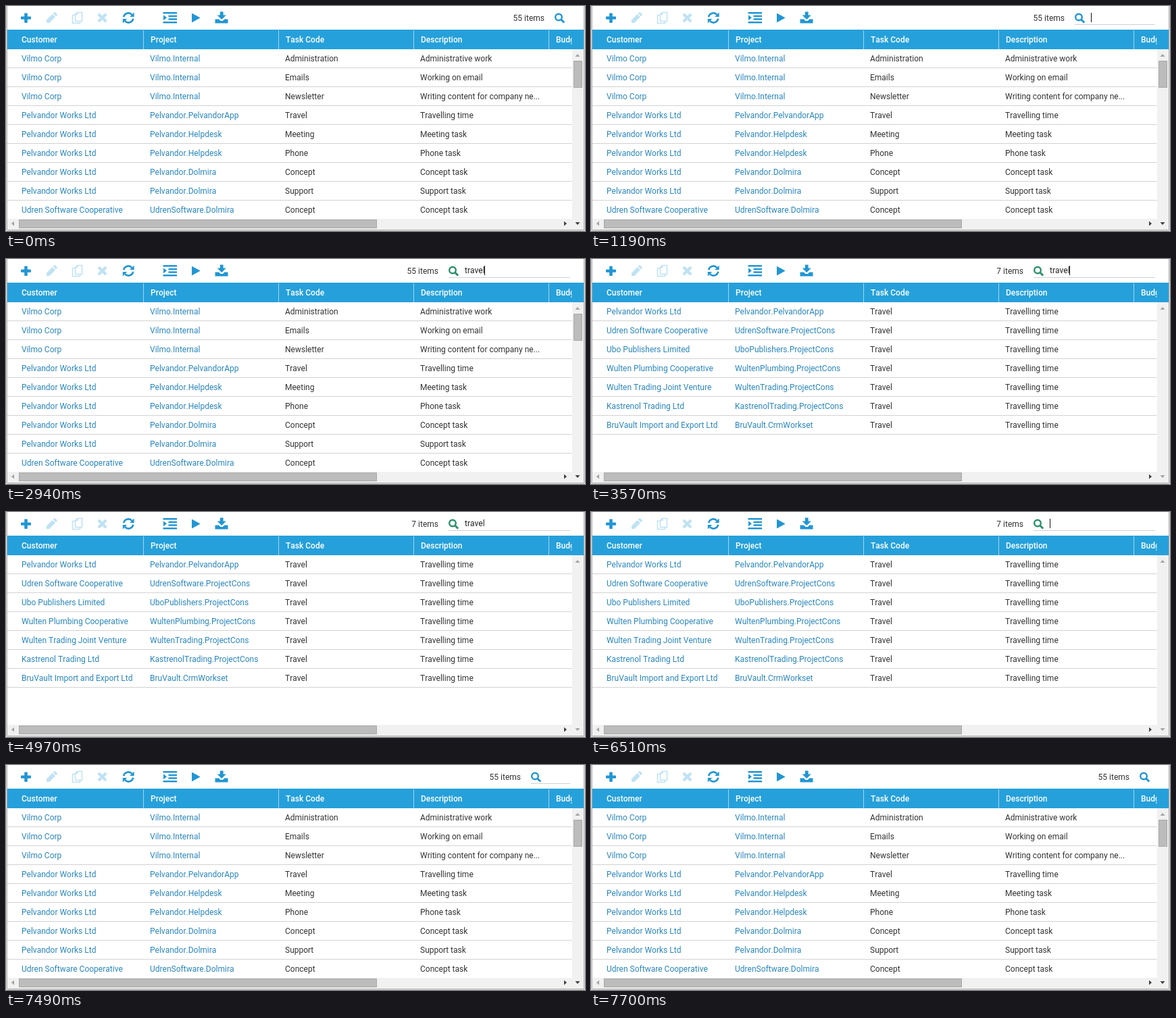
These frames come from a looping animation (857x333 px, 8.82 s). An HTML page:

```html
<!DOCTYPE html>
<html lang="en">
<head>
<meta charset="utf-8">
<title>Task grid search</title>
<style>
  html, body { margin: 0; width: 100%; height: 100%; overflow: hidden; background: #fff; }
  svg { display: block; }
  text { font: 12px Roboto, Arial, sans-serif; font-kerning: none; fill: #333; white-space: pre; }
  .head text { font-weight: 500; fill: #fff; }
  .link { fill: #2a86bd; }
  .icon { fill: #2196d3; }
  .off { fill: #bfe2f4; }
</style>
</head>
<body>
<svg id="stage" width="857" height="333" viewBox="0 0 857 333">
  <defs>
    <clipPath id="body"><rect x="2" y="36" width="835.5" height="279"/></clipPath>
  </defs>
  <rect width="857" height="333" fill="#fff"/>

  <g class="icon">
    <path d="M28 10.5h3q.8 0 .8.8v4.3h4.400q.8 0 .8.8V19q0 .8-.8.8h-4.400v4.300q0 .8-.8.8h-3q-.8 0-.8-.8v-4.300h-4.400q-.8 0-.8-.8v-2.600q0-.8.8-.8h4.400v-4.300q0-.8.8-.8z"/>
    <g id="arrow"><path d="M174.200 16.200A7 7 0 0 1 186.300 12.800" fill="none" stroke="#2196d3" stroke-width="2.700"/><path d="M189.600 9.600v6.400h-6.400z"/></g>
    <use href="#arrow" transform="rotate(180 181.200 17.500)"/>
    <path d="M232.500 9H253v2.500h-20.500zM240.500 13.700H253v2.500h-12.500zM240.500 18.300H253v2.500h-12.500zM232.500 23H253v2.500h-20.500zM233 13.200l5 4-5 4z"/>
    <path d="M275 11.300q0-.8.800-.400l11 6.200q.7.400 0 .8l-11 6.200q-.8.400-.8-.4z"/>
    <path d="M316.800 8.500h4.800v5h4.200l-6.600 6.500-6.600-6.500h4.200zM309.500 19.500h5.500l2.600 2.500h3.200l2.600-2.500h5.100v6h-19z"/>
  </g>
  <g class="off">
    <path d="M60 25v-4.300l8.600-8.700 4.300 4.300L64.300 25zM69.600 11l1.600-1.500q1-.8 1.900 0l2.400 2.400q.8 1 0 1.900L73.900 15.300z"/>
    <path d="M105.500 9.500h7V22.500H102.500V12.500zM105.500 9.500v3h-3M102.500 13.500H98.500V25.500H109.500V22.500" fill="none" stroke="#bfe2f4" stroke-width="1.500"/>
    <g transform="translate(142.500 17.500) rotate(45)"><rect x="-8" y="-2.100" width="16" height="4.200" rx=".8"/><rect x="-2.100" y="-8" width="4.200" height="16" rx=".8"/></g>
  </g>

  <rect x="2" y="35" width="853" height="29" fill="#26a0da"/>
  <g class="head" id="head" clip-path="url(#body)"></g>
  <g id="rows" clip-path="url(#body)"></g>

  <rect x="2" y="315" width="836" height="16" fill="#f1f1f1"/>
  <rect x="838" y="64" width="17" height="267" fill="#f1f1f1"/>
  <rect x="19.500" y="316.500" width="529" height="12" fill="#bcbcbc" stroke="#a8a8a8"/>
  <rect id="thumb" x="840.500" y="81.500" width="12" height="39" fill="#bcbcbc" stroke="#a8a8a8"/>
  <path d="M12 318.500v7l-4-3.500zM842.500 75h7l-3.500-4z" fill="#a3a3a3"/>
  <path d="M826 318.500v7l4-3.500z" fill="#404040"/>
  <path id="down" d="M842.500 320h7l-3.500 4z"/>
  <path d="M.5 0V332.500H856.500V0" fill="none" stroke="#dcdcdc"/>
  <path d="M1.500 0V331.500H855.500V0" fill="none" stroke="#adadad"/>

  <text id="count" y="22" text-anchor="end"></text>
  <g id="field">
    <g id="lens" fill="none" stroke-width="2.400">
      <circle cx="6" cy="16.500" r="4.800"/>
      <path d="M9.600 20l4.600 4.500" stroke-width="3"/>
    </g>
  </g>
  <rect id="line" y="27" height="1" fill="#d0d0d0"/>
  <rect id="mark" y="10" height="14" fill="#39f"/>
  <text id="query" x="679" y="21"></text>
  <rect id="caret" y="10" width="1" height="14" fill="#111"/>
</svg>
<script>
const $ = id => document.getElementById(id);
const LOOP = 8820, STEP = 70, RIGHT = 835, CLOSED = 23, OPEN = 180;
const cols = [23, 213, 413, 613, 813];
const pelvandor = 'Pelvandor Works Ltd';
const all = [
  ['Vilmo Corp', 'Vilmo.Internal', 'Administration', 'Administrative work'],
  ['Vilmo Corp', 'Vilmo.Internal', 'Emails', 'Working on email'],
  ['Vilmo Corp', 'Vilmo.Internal', 'Newsletter', 'Writing content for company ne...'],
  [pelvandor, 'Pelvandor.PelvandorApp', 'Travel', 'Travelling time'],
  [pelvandor, 'Pelvandor.Helpdesk', 'Meeting', 'Meeting task'],
  [pelvandor, 'Pelvandor.Helpdesk', 'Phone', 'Phone task'],
  [pelvandor, 'Pelvandor.Dolmira', 'Concept', 'Concept task'],
  [pelvandor, 'Pelvandor.Dolmira', 'Support', 'Support task'],
  ['Udren Software Cooperative', 'UdrenSoftware.Dolmira', 'Concept', 'Concept task']
];
const found = [
  [pelvandor, 'Pelvandor.PelvandorApp'],
  ['Udren Software Cooperative', 'UdrenSoftware.ProjectCons'],
  ['Ubo Publishers Limited', 'UboPublishers.ProjectCons'],
  ['Wulten Plumbing Cooperative', 'WultenPlumbing.ProjectCons'],
  ['Wulten Trading Joint Venture', 'WultenTrading.ProjectCons'],
  ['Kastrenol Trading Ltd', 'KastrenolTrading.ProjectCons'],
  ['BruVault Import and Export Ltd', 'BruVault.CrmWorkset']
].map(r => [...r, 'Travel', 'Travelling time']);

function add(parent, tag, attrs, text = '') {
  const el = document.createElementNS('http://www.w3.org/2000/svg', tag);
  for (const k in attrs) el.setAttribute(k, attrs[k]);
  el.textContent = text;
  return parent.appendChild(el);
}

function table(rows) {
  const g = add($('rows'), 'g', {});
  rows.forEach((row, i) => {
    const y = 64 + 28 * i;
    row.forEach((s, c) => add(g, 'text', { x: cols[c], y: y + 18, class: c < 2 ? 'link' : '' }, s));
    add(g, 'rect', { x: 2, y: y + 27, width: 836, height: 1, fill: '#d2d2d2' });
  });
  return g;
}

// Each header cell but the first has a 1px left border that shifts its label
['Customer', 'Project', 'Task Code', 'Description', 'Budget'].forEach((s, c) => {
  const border = c ? 1 : 0;
  add($('head'), 'text', { x: cols[c] + border, y: 54 }, s);
  add($('head'), 'rect', { x: cols[c] - 10, y: 36, width: border, height: 28, fill: '#a0d6f0' });
});
const allRows = table(all), foundRows = table(found);

// CSS "ease": cubic-bezier(.25, .1, .25, 1)
function ease(x) {
  if (x <= 0) return 0;
  if (x >= 1) return 1;
  const bez = (u, a, b) => 3 * u * (1 - u) * (1 - u) * a + 3 * u * u * (1 - u) * b + u ** 3;
  let lo = 0, hi = 1;
  for (let i = 0; i < 24; i++) {
    const mid = (lo + hi) / 2;
    if (bez(mid, .25, .25) < x) lo = mid; else hi = mid;
  }
  return bez(lo, .1, 1);
}

const show = (el, on) => el.setAttribute('visibility', on ? 'visible' : 'hidden');
const set = (id, attrs) => { for (const k in attrs) $(id).setAttribute(k, attrs[k]); };
const keys = [2030, 2240, 2310, 2660, 2800, 2940];

function draw(time) {
  const t = Math.floor((time % LOOP) / STEP) * STEP;
  const within = (a, b) => t >= a && t < b;

  const grow = ease((t - 1045) / 410) - ease((t - 7300) / 400);
  const w = Math.round(CLOSED + (OPEN - CLOSED) * grow), left = RIGHT - w;
  set('field', { transform: `translate(${left} 0)` });
  set('lens', { stroke: within(1330, 7350) ? '#2c8f6e' : '#2196d3' });
  set('line', { x: left, width: w });
  show($('line'), w > CLOSED + 1);

  const filtered = within(3570, 7070);
  show(allRows, !filtered);
  show(foundRows, filtered);
  show($('thumb'), !filtered);
  set('down', { fill: filtered ? '#a3a3a3' : '#404040' });
  $('count').textContent = (filtered ? 7 : 55) + ' items';
  set('count', { x: left - 15 });

  const typed = t < 6510 ? 'travel'.slice(0, keys.filter(k => t >= k).length) : '';
  const selected = within(5740, 6510);
  $('query').textContent = typed;
  $('query').style.fill = selected ? '#fff' : '#222';
  const len = typed ? $('query').getComputedTextLength() : 0;
  set('mark', { x: 679, width: Math.round(len) });
  show($('mark'), selected);

  const blink = within(1960, 2030) || within(3990, 4480) || within(4970, 5460);
  set('caret', { x: left + 24 + Math.floor(len) });
  show($('caret'), within(1120, 7350) && !blink && !selected);
}

function tick(now) {
  draw(now);
  requestAnimationFrame(tick);
}
draw(0);
requestAnimationFrame(tick);
</script>
</body>
</html>
```
